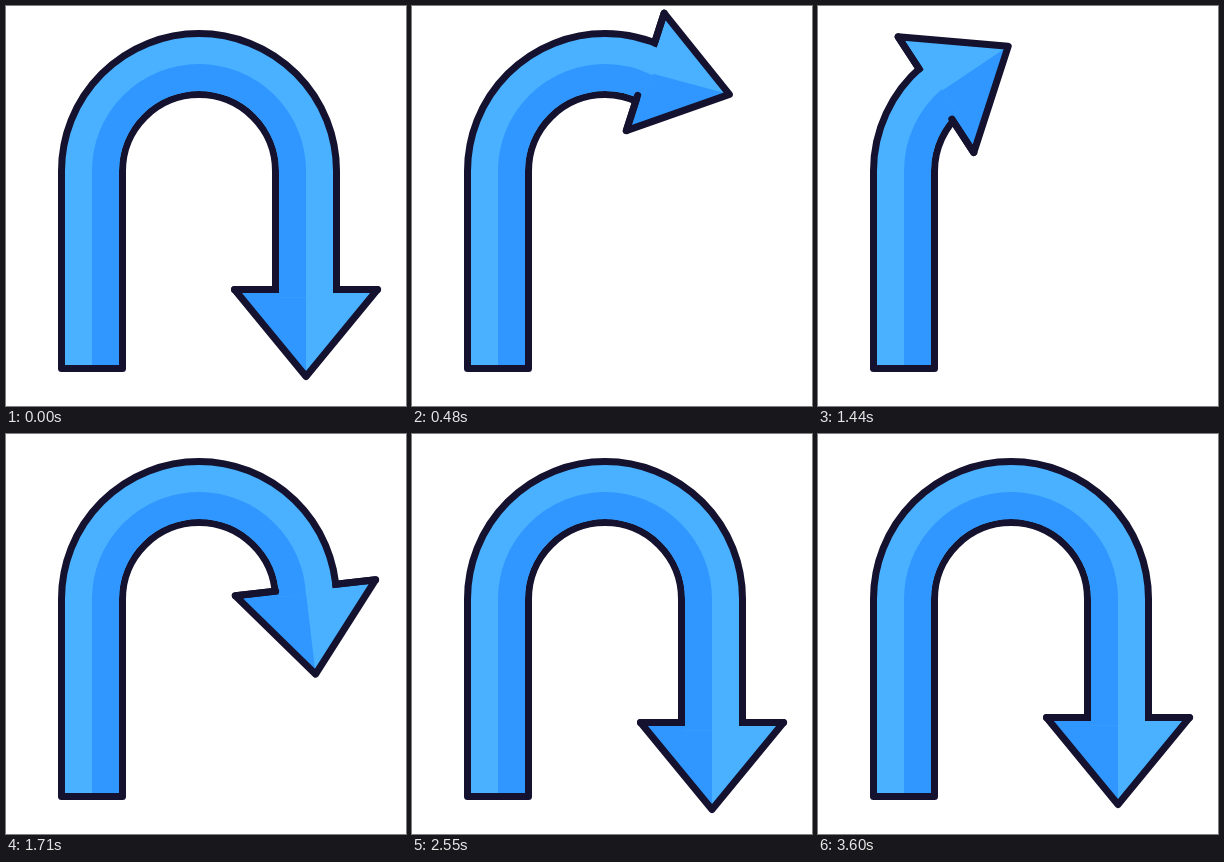
These frames come from a looping animation (400x400 px, 3630 ms). An HTML page with a canvas:

```html
<!DOCTYPE html>
<html lang="en">
<head>
<meta charset="utf-8">
<title>U-turn arrow</title>
<style>
  html, body { margin: 0; width: 100%; height: 100%; overflow: hidden; background: #fff; }
  canvas { display: block; width: 400px; height: 400px; }
</style>
</head>
<body>
<canvas id="stage" width="400" height="400"></canvas>
<script>
const ctx = document.getElementById('stage').getContext('2d');
const LOOP = 3630;
const INK = '#14122f', LIGHT = '#49b1ff', DARK = '#2f97ff';
const CX = 193, CY = 165, R = 107, FOOT = 362.5;
const HALF = 30.5, LINE = 7, WING = 71.5, HEAD = 87;
const ARC = Math.PI * R, REST = ARC + 118.5;
const RAD = Math.PI / 180;

// time, distance along the bend, ease x1 and x2 towards the next step
const STEPS = [
  [0, REST, 0.22, 0.44],
  [1200, 5, 0.385, 0.39],
  [2200, REST + 25, 0.54, 0.41],
  [2750, REST, 0, 1],
  [LOOP, REST, 0, 1]
];

// bend angle, extra turn of the head (degrees), half width of the head
const POSES = [
  [0, 6, WING],
  [13.5, 9.5, WING],
  [47, 11.5, 69],
  [114, -4.7, 61.5],
  [180, 0, WING]
];

function ease(p, x1, x2) {
  let lo = 0, hi = 1;
  for (let i = 0; i < 30; i++) {
    const s = (lo + hi) / 2, q = 1 - s;
    if (3 * x1 * s * q * q + 3 * x2 * s * s * q + s * s * s < p) lo = s;
    else hi = s;
  }
  return lo * lo * (3 - 2 * lo);
}

function span(table, x) {
  let i = 0;
  while (i < table.length - 2 && x >= table[i + 1][0]) i++;
  const a = table[i], b = table[i + 1];
  return [a, b, Math.min(1, (x - a[0]) / (b[0] - a[0]))];
}

const mix = (a, b, p) => a + (b - a) * p;

function distanceAt(t) {
  const [a, b, p] = span(STEPS, t);
  return mix(a[1], b[1], ease(p, a[2], a[3]));
}

function poseAt(deg) {
  const [a, b, p] = span(POSES, deg);
  return [mix(a[1], b[1], p), mix(a[2], b[2], p)];
}

function shaft(dist, radius, width, color, foot) {
  const bend = Math.min(dist / R, Math.PI);
  ctx.beginPath();
  ctx.moveTo(CX - radius, foot);
  ctx.lineTo(CX - radius, CY);
  ctx.arc(CX, CY, radius, Math.PI, Math.PI + bend);
  if (dist > ARC) ctx.lineTo(CX + radius, CY + dist - ARC);
  ctx.lineWidth = width;
  ctx.strokeStyle = color;
  ctx.stroke();
}

function triangle(x1, x2, tip) {
  ctx.beginPath();
  ctx.moveTo(x1, 0);
  ctx.lineTo(x2, 0);
  ctx.lineTo(tip, -HEAD);
  ctx.closePath();
}

function rule(x1, x2, y) {
  ctx.lineCap = 'round';
  ctx.lineWidth = LINE;
  ctx.strokeStyle = INK;
  ctx.beginPath();
  ctx.moveTo(x1, y);
  ctx.lineTo(x2, y);
  ctx.stroke();
}

function inHead(x, y, turn, paint) {
  ctx.save();
  ctx.translate(x, y);
  ctx.rotate(turn);
  paint();
  ctx.restore();
}

function draw(t) {
  const dist = distanceAt(t);
  const bend = Math.min(dist / R, Math.PI);
  const [lead, wing] = poseAt(bend / RAD);
  const x = CX - R * Math.cos(bend);
  const y = CY - R * Math.sin(bend) + Math.max(0, dist - ARC);
  const turn = bend + lead * RAD;
  const squeeze = WING - wing;
  const tip = -0.45 * squeeze;
  const reach = dist + 8;

  ctx.fillStyle = '#fff';
  ctx.fillRect(0, 0, 400, 400);
  ctx.lineJoin = 'round';

  ctx.lineCap = 'butt';
  shaft(reach, R, 2 * HALF + LINE, INK, FOOT);
  rule(CX - R - HALF, CX - R + HALF, FOOT);

  inHead(x, y, turn, () => {
    triangle(-wing, wing, tip);
    ctx.fillStyle = LIGHT;
    ctx.fill();
    triangle(0, wing, tip);
    ctx.fillStyle = DARK;
    ctx.fill();
    triangle(-wing, wing, tip);
    ctx.lineWidth = LINE;
    ctx.strokeStyle = INK;
    ctx.stroke();
  });

  const inner = HALF - LINE / 2;
  ctx.lineCap = 'butt';
  shaft(reach, R, 2 * inner, LIGHT, FOOT - LINE / 2);
  shaft(reach, R - inner / 2, inner, DARK, FOOT - LINE / 2);

  // close the corners where the shaft meets the head
  inHead(x, y, turn, () => {
    rule(-wing, -HALF, 0);
    rule(wing, HALF - 0.6 * squeeze, 0);
  });
}

const start = performance.now();
function tick() {
  draw((performance.now() - start) % LOOP);
  requestAnimationFrame(tick);
}
tick();
</script>
</body>
</html>
```
